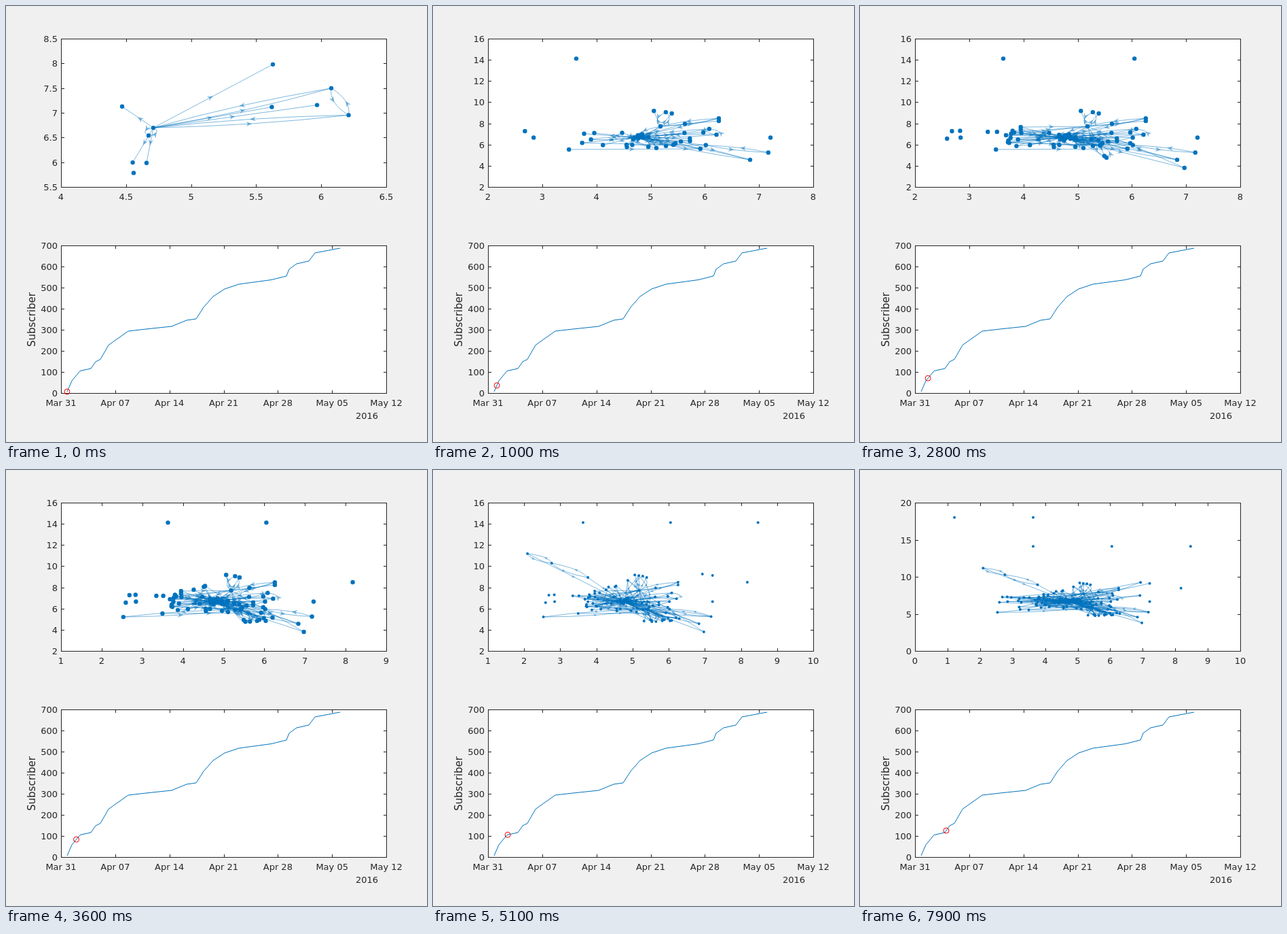
These frames come from a looping animation (620 by 641 pixels, 8 s). An HTML page with a canvas:

```html
<!DOCTYPE html>
<html lang="en">
<head>
<meta charset="utf-8">
<title>Subscriber network</title>
<style>
  html, body { margin: 0; width: 100%; height: 100%; overflow: hidden; background: #f0f0f0; }
  canvas { display: block; }
</style>
</head>
<body>
<canvas id="stage" width="620" height="641"></canvas>
<script>
const ctx = document.getElementById('stage').getContext('2d');
const LOOP = 8000, STEP = 100;
const INK = '#262626', BLUE = '#0072bd';
const LEFT = 81, WIDTH = 480;

let seed = 11;
const rand = () => (seed = (seed * 16807) % 2147483647) / 2147483647;
const lerp = (a, b, k) => a + (b - a) * k;

// Value at x on a polyline of [x, y] points
function along(points, x) {
  let i = 1;
  while (i < points.length - 1 && points[i][0] < x) i++;
  const [a, b] = [points[i - 1], points[i]];
  return lerp(a[1], b[1], Math.min(1, (x - a[0]) / (b[0] - a[0])));
}

// ---- Network: people arrive over time and link to hubs ----
const nodes = [], links = [];
const A = [4.708, 6.7], B = [5.175, 7.73], C = [5.41, 5.92];

function link(from, to, t, mutual = false) {
  if (from === to) return;
  links.push({ from, to, t, bent: mutual });
  if (mutual) links.push({ from: to, to: from, t, bent: true });
}

const inCore = n => Math.abs(n.p[0] - 4.9) < 0.8 && Math.abs(n.p[1] - 6.6) < 0.9;

function arrive(start, end, hub, points) {
  points.forEach((p, i) => {
    const t = Math.ceil(lerp(start, end, (i + 1) / points.length) / STEP) * STEP;
    const core = nodes.filter(inCore);
    nodes.push({ p, t });
    if (!hub) return;
    link(hub, p, t, t > 0 && rand() < 0.3);
    if (t < 600) return;
    const others = (t < 1700 ? [A, B] : [A, B, C]).filter(h => h !== hub);
    if (rand() < 0.25) link(p, others[Math.floor(rand() * others.length)], t, t > 4000);
    if (rand() < 0.35) link(core[Math.floor(rand() * core.length)].p, p, t);
  });
}

// Newcomers on an elliptic arc around a hub, angles in degrees
function fan(start, end, hub, count, from, to, rx, ry) {
  arrive(start, end, hub, Array.from({ length: count }, (_, i) => {
    const angle = lerp(from, to, (i + rand()) / count) * Math.PI / 180;
    const r = 0.75 + 0.25 * rand();
    return [hub[0] + rx * r * Math.cos(angle), hub[1] + ry * r * Math.sin(angle)];
  }));
}

function scatter(start, end, count, cx, cy, w, h) {
  const spot = () => [cx + (rand() + rand() - 1) * w, cy + (rand() + rand() - 1) * h];
  arrive(start, end, A, Array.from({ length: count }, spot));
}

// Unlinked people stand on a coarse grid
const outlier = (column, row) => [1.21 + 2.415 * column, 14.12 + 3.9 * row];

// Founders
const near = [4.672, 6.545], top1 = [6.073, 7.5], right1 = [6.206, 6.957], lone = [4.557, 5.79];
arrive(0, 0, null, [A, near, top1, right1, lone]);
arrive(0, 0, A, [[5.625, 7.98], [4.469, 7.13], [4.55, 6], [4.656, 5.99], [5.617, 7.12], [5.964, 7.16]]);
[near, top1, right1].forEach(p => link(A, p, 0, true));
link(top1, right1, 0, true);

// First day
const low = [5.91, 5.62], bend = [6.01, 5.97], west = [3.49, 5.56], east = [7.16, 5.27];
const quad = [[2.68, 7.29], [2.84, 6.68], [2.59, 6.58], [2.83, 7.32]];
arrive(0, 100, A, [B]);
fan(100, 400, A, 8, -80, -5, 1.2, 1.1);
fan(400, 900, A, 5, 140, 235, 1.1, 1.3);
fan(400, 900, B, 3, 55, 120, 0.8, 1.5);
fan(400, 900, B, 2, 25, 45, 1.5, 1.1);
arrive(300, 900, null, [outlier(1, 0), quad[0], quad[1], west, east, [7.2, 6.68]]);
arrive(500, 800, A, [low, bend]);
scatter(300, 900, 6, 4.82, 6.7, 0.25, 0.4);
arrive(900, 1000, A, [[6.825, 4.59]]);
link(west, low, 800);
link(bend, east, 900, true);
link(A, lone, 1000);

// Second day
const aloof = [[3.34, 7.22], [3.51, 7.22]], southwest = [2.53, 5.23];
fan(1000, 1700, A, 9, 130, 215, 1.15, 1.7);
arrive(1000, 1700, A, [C, [6.96, 3.83]]);
fan(1000, 1700, A, 2, -45, 5, 1.5, 1);
arrive(1000, 1700, null, [quad[2], aloof[0]]);
scatter(1000, 2300, 7, 4.9, 6.6, 0.6, 0.5);
fan(2500, 3600, C, 8, -90, -42, 1.25, 1.3);
fan(2500, 3600, A, 3, 95, 135, 0.7, 1.7);
arrive(2500, 3000, null, [outlier(2, 0), quad[3], aloof[1], southwest, [8.16, 8.5]]);
scatter(2500, 3600, 4, 5, 6.5, 0.8, 0.6);
link(C, southwest, 3000, true);

// Third day
const chain = [0, 0.6, 1].map(k => [lerp(3.76, 2.09, k), lerp(8.95, 11.2, k)]);
const pair = [[6.92, 9.27], [7.2, 9.14]];
fan(3600, 5100, A, 5, 115, 220, 0.9, 1.6);
fan(3600, 5100, C, 5, -105, -40, 1.25, 1.3);
fan(3600, 5100, B, 2, 70, 130, 0.6, 1.5);
arrive(4400, 4800, null, [...chain, outlier(3, 0)]);
arrive(4800, 5100, null, pair);
scatter(3600, 5100, 3, 4.9, 6.8, 0.7, 0.7);
chain.forEach((p, i) => link(p, chain[i + 1] || A, 4700, i < 2));
link(chain[0], A, 4700);
aloof.forEach(p => link(A, p, 4500, true));
link(C, east, 4500, true);

// Fourth day
arrive(5100, 5700, null, [outlier(0, 1)]);
fan(5100, 6600, A, 2, 15, 45, 2.5, 2);
scatter(5200, 6600, 3, 4.7, 6.8, 0.6, 0.6);
fan(6600, 7900, A, 6, 150, 220, 1.9, 1.8);
arrive(7100, 7400, null, [outlier(1, 1)]);
scatter(6600, 7900, 8, 4.7, 6.8, 0.8, 0.5);
[...quad, ...pair].forEach((p, i) => link(A, p, 7200 + i * STEP, i % 2 === 0));

// ---- Subscriber curve and marker path, in stage pixels ----
const CURVE = [
  [90, 567], [97, 551], [109, 536.5], [125, 533], [132, 523], [139, 519.5], [151, 498.5], [180, 478],
  [206, 475], [244, 471], [266, 462], [280, 460], [291, 443], [305, 427], [322, 416], [343, 409],
  [391, 402.5], [413, 397], [417, 387], [428, 379], [446, 375], [455, 363], [492, 356]
];
const MARKER = [[0, 90], [1000, 94], [2300, 98.8], [2500, 98.8], [5100, 110], [7900, 127]];

// ---- Drawing ----
function text(str, x, y, align = 'center') {
  ctx.fillStyle = INK;
  ctx.textAlign = align;
  ctx.fillText(str, x, y);
}

function segment(x1, y1, x2, y2) {
  ctx.beginPath();
  ctx.moveTo(x1, y1);
  ctx.lineTo(x2, y2);
  ctx.stroke();
}

function axes(top, height, xLabels, yLabels) {
  const right = LEFT + WIDTH, bottom = top + height + 1;
  ctx.font = '13px "DejaVu Sans", sans-serif';
  ctx.fillStyle = '#fff';
  ctx.fillRect(LEFT, top, WIDTH, height + 1);
  ctx.strokeStyle = INK;
  ctx.lineWidth = 1;
  ctx.strokeRect(LEFT + 0.5, top + 0.5, WIDTH - 1, height);
  xLabels.forEach((label, i) => {
    const x = LEFT + (WIDTH - 1) * i / (xLabels.length - 1);
    const px = Math.round(x) + 0.5;
    segment(px, top, px, top + 5);
    segment(px, bottom - 5, px, bottom);
    text(label, x, bottom + 18);
  });
  yLabels.forEach((label, i) => {
    const y = Math.round(top + height * (1 - i / (yLabels.length - 1)));
    segment(LEFT, y + 0.5, LEFT + 5, y + 0.5);
    segment(right - 5, y + 0.5, right, y + 0.5);
    text(label, 76, y + 5, 'right');
  });
}

const range = (a, b, step) =>
  Array.from({ length: Math.round((b - a) / step) + 1 }, (_, i) => String(+(a + i * step).toFixed(1)));

// Limits on whole ticks, with a tenth of the spread as padding
function limits(values) {
  const min = Math.min(...values), max = Math.max(...values), pad = (max - min) / 10;
  const span = max - min + 2 * pad;
  const step = span < 4 ? 0.5 : span < 10 ? 1 : span < 15 ? 2 : 5;
  return [Math.floor((min - pad) / step) * step, Math.ceil((max + pad) / step) * step, step];
}

function arrow(x, y, angle, size) {
  ctx.save();
  ctx.translate(x, y);
  ctx.rotate(angle);
  ctx.beginPath();
  ctx.moveTo(0, 0);
  ctx.lineTo(-size, -size * 0.42);
  ctx.lineTo(-size * 0.7, 0);
  ctx.lineTo(-size, size * 0.42);
  ctx.fill();
  ctx.restore();
}

function network(t) {
  const present = nodes.filter(n => n.t <= t);
  const [x0, x1, dx] = limits(present.map(n => n.p[0]));
  const [y0, y1, dy] = limits(present.map(n => n.p[1]));
  axes(48, 218, range(x0, x1, dx), range(y0, y1, dy));
  const px = x => LEFT + WIDTH * (x - x0) / (x1 - x0);
  const py = y => 48 + 218.5 * (y1 - y) / (y1 - y0);
  const small = present.length > 100;
  const bow = 0.018 * (x1 - x0);

  ctx.strokeStyle = ctx.fillStyle = 'rgba(0,114,189,.5)';
  for (const { from: [ax, ay], to: [bx, by], t: born, bent } of links) {
    if (born > t) continue;
    const k = bent ? bow / Math.hypot(bx - ax, by - ay) : 0;
    const mx = (ax + bx) / 2, my = (ay + by) / 2;
    const ox = (by - ay) * k, oy = (ax - bx) * k;
    ctx.beginPath();
    ctx.moveTo(px(ax), py(ay));
    ctx.quadraticCurveTo(px(mx + 2 * ox), py(my + 2 * oy), px(bx), py(by));
    ctx.stroke();
    arrow(px(mx + ox), py(my + oy), Math.atan2(py(by) - py(ay), px(bx) - px(ax)), small ? 5 : 8.5);
  }

  ctx.fillStyle = BLUE;
  for (const { p } of present) {
    ctx.beginPath();
    ctx.arc(px(p[0]), py(p[1]), small ? 2 : 3.2, 0, 7);
    ctx.fill();
  }
}

function subscribers(t) {
  const dates = ['Mar 31', 'Apr 07', 'Apr 14', 'Apr 21', 'Apr 28', 'May 05', 'May 12'];
  axes(352, 217, dates, range(0, 700, 100));
  text('2016', 548, 607, 'right');
  ctx.save();
  ctx.translate(43, 461);
  ctx.rotate(-Math.PI / 2);
  ctx.font = '15px "DejaVu Sans", sans-serif';
  text('Subscriber', 0, 0);
  ctx.restore();

  ctx.strokeStyle = BLUE;
  ctx.beginPath();
  CURVE.forEach(([x, y]) => ctx.lineTo(x, y));
  ctx.stroke();

  const x = along(MARKER, t);
  ctx.strokeStyle = '#f00';
  ctx.beginPath();
  ctx.arc(x, along(CURVE, x), 4, 0, 7);
  ctx.stroke();
}

function draw() {
  const t = Math.floor(performance.now() % LOOP / STEP) * STEP;
  ctx.fillStyle = '#f0f0f0';
  ctx.fillRect(0, 0, 620, 641);
  network(t);
  subscribers(t);
  requestAnimationFrame(draw);
}
draw();
</script>
</body>
</html>
```
